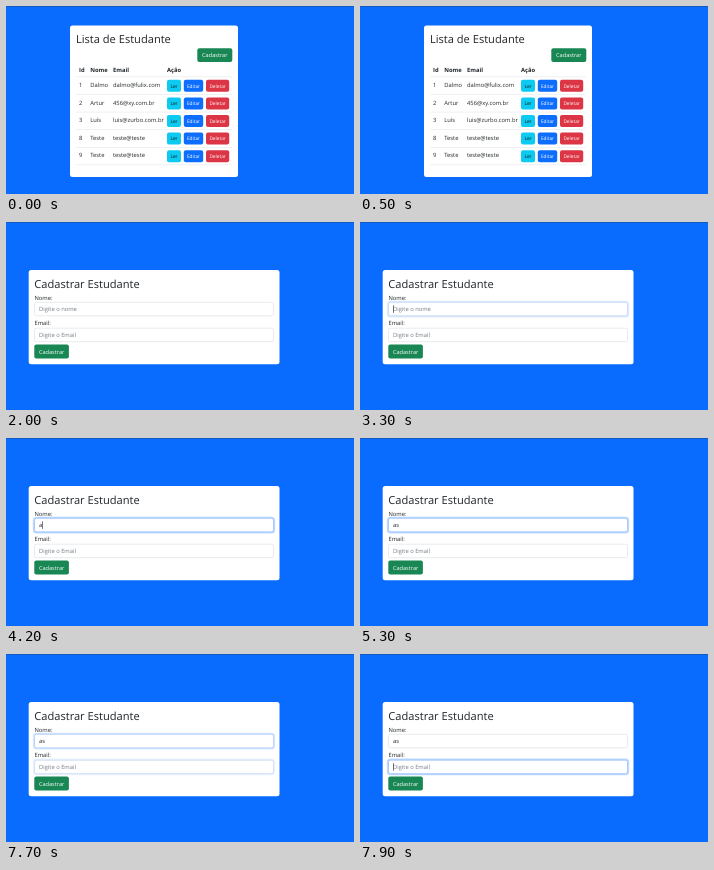
Write an HTML page that moves like this. It is 348 by 188 pixels and loops after 8000 ms.

```html
<!DOCTYPE html>
<html lang="pt-BR">
<head>
<meta charset="utf-8">
<title>Lista de Estudante</title>
<style>
html, body { margin: 0; width: 100%; height: 100%; overflow: hidden; background: #096cfe; }
svg { display: block; width: 100%; height: 100%; }
text {
  font-family: "Open Sans", "Noto Sans", sans-serif;
  font-size: 5.8px;
  fill: #212529;
  text-rendering: geometricPrecision;
  white-space: pre;
}
.title { font-size: 11.1px; font-weight: 500; }
.head { font-weight: 700; }
.btn { font-size: 5.6px; fill: #fff; text-anchor: middle; }
.small { font-size: 4.8px; }
.dark { fill: #10191d; }
.hint { fill: #757c83; }
</style>
</head>
<body>
<svg id="stage" viewBox="0 0 348 188" preserveAspectRatio="none"></svg>
<script>
const LOOP = 8000, STEP = 100;
const GREEN = [25, 135, 84], GREEN_HOVER = [18, 108, 66];
const BORDER = [222, 226, 230], FOCUS = [134, 183, 254];
const stage = document.getElementById('stage');

function add(parent, tag, attrs, content) {
  const el = document.createElementNS('http://www.w3.org/2000/svg', tag);
  for (const key in attrs) el.setAttribute(key, attrs[key]);
  if (content) el.textContent = content;
  parent.appendChild(el);
  return el;
}
const box = (parent, x, y, width, height, fill, rx = 0) =>
  add(parent, 'rect', { x, y, width, height, fill, rx });
const label = (parent, x, y, content, cls = '') =>
  add(parent, 'text', { x, y, class: cls }, content);

function button(parent, x, y, w, h, fill, content, cls = '') {
  const rect = box(parent, x, y, w, h, fill, 2);
  label(parent, x + w / 2, y + h / 2 + (cls ? 1.8 : 2), content, 'btn ' + cls);
  return rect;
}

function field(parent, y, hint) {
  const ring = add(parent, 'rect', {
    x: 27.6, y: y - 0.9, width: 240.8, height: 15.3, rx: 2.8,
    fill: 'none', stroke: '#0d6efd', 'stroke-width': 1.5
  });
  const frame = add(parent, 'rect', {
    x: 28.5, y, width: 239, height: 13.5, rx: 2, fill: '#fff', 'stroke-width': 0.7
  });
  const text = label(parent, 33, y + 8.8, hint);
  const caret = box(parent, 33, y + 3, 0.6, 7.6, '#212529');
  return { ring, frame, text, caret, hint };
}

box(stage, 0, 0, 348, 188, '#096cfe');
box(stage, 0, 0, 348, 0.6, '#1c4f9e');

// Student list
const list = add(stage, 'g', {});
box(list, 64, 19.5, 168, 151.5, '#fff', 2.5);
label(list, 70, 37.2, 'Lista de Estudante', 'title');
const newBtn = button(list, 191.3, 42.2, 35, 13.8, '', 'Cadastrar');
const columns = [73, 84.3, 107];
['Id', 'Nome', 'Email', 'Ação'].forEach((name, i) =>
  label(list, [...columns, 161][i], 66, name, 'head'));
box(list, 70, 70.6, 156, 0.5, '#dee2e6');
[
  ['1', 'Dalmo', 'dalmo@fulix.com'],
  ['2', 'Artur', '456@xy.com.br'],
  ['3', 'Luís', 'luis@zurbo.com.br'],
  ['8', 'Teste', 'teste@teste'],
  ['9', 'Teste', 'teste@teste']
].forEach((row, i) => {
  const y = 73.8 + i * 17.6;
  row.forEach((cell, c) => label(list, columns[c], y + 7.2, cell));
  button(list, 161, y, 14, 12, '#0dcaf0', 'Ler', 'small dark');
  button(list, 177.8, y, 19.4, 12, '#0d6efd', 'Editar', 'small');
  button(list, 200, y, 23.2, 12, '#dc3545', 'Deletar', 'small');
  box(list, 70, y + 14.4, 156, 0.5, '#dee2e6');
});

// Registration form
const form = add(stage, 'g', {});
box(form, 22.7, 48, 250.8, 94.3, '#fff', 2.5);
label(form, 28.3, 66, 'Cadastrar Estudante', 'title');
label(form, 28.5, 77.7, 'Nome:');
const nameField = field(form, 80.3, 'Digite o nome');
label(form, 28.5, 103.4, 'Email:');
const mailField = field(form, 106.2, 'Digite o Email');
const sendBtn = button(form, 28.3, 122.5, 34.6, 14, '', 'Cadastrar');

const ramp = (t, from, to) => Math.min(1, Math.max(0, (t - from) / (to - from)));
const mix = (a, b, k) => `rgb(${a.map((v, i) => Math.round(v + (b[i] - v) * k))})`;
const within = (t, spans) => spans.some(([from, to]) => t >= from && t < to);

function setField(f, focus, value, caretOn) {
  f.ring.setAttribute('stroke-opacity', 0.27 * focus);
  f.frame.setAttribute('stroke', mix(BORDER, FOCUS, focus));
  f.text.textContent = value || f.hint;
  f.text.setAttribute('class', value ? '' : 'hint');
  f.caret.setAttribute('x', 33 + [0, 3.3, 6.1][value.length]);
  f.caret.setAttribute('visibility', caretOn ? 'inherit' : 'hidden');
}

const nameCaret = [[3300, 3800], [4200, 4700], [4800, 5300], [5800, 6400], [6900, 7400]];
const mailCaret = [[7800, 8000]];

function draw(time) {
  const t = Math.floor(time % LOOP / STEP) * STEP;
  const onList = t < 2000;
  list.setAttribute('visibility', onList ? 'visible' : 'hidden');
  form.setAttribute('visibility', onList ? 'hidden' : 'visible');
  newBtn.setAttribute('fill', mix(GREEN, GREEN_HOVER, ramp(t, 900, 1200)));

  const hover = ramp(t, 5600, 5900) - ramp(t, 7100, 7200);
  sendBtn.setAttribute('fill', mix(GREEN, GREEN_HOVER, hover));

  const moved = ramp(t, 7600, 7900);
  const typed = 'as'.slice(0, (t >= 4200) + (t >= 4800));
  setField(nameField, ramp(t, 3200, 3400) - moved, typed, within(t, nameCaret));
  setField(mailField, moved, '', within(t, mailCaret));
}

const start = performance.now();
function tick() {
  draw(performance.now() - start);
  requestAnimationFrame(tick);
}
tick();
</script>
</body>
</html>
```
